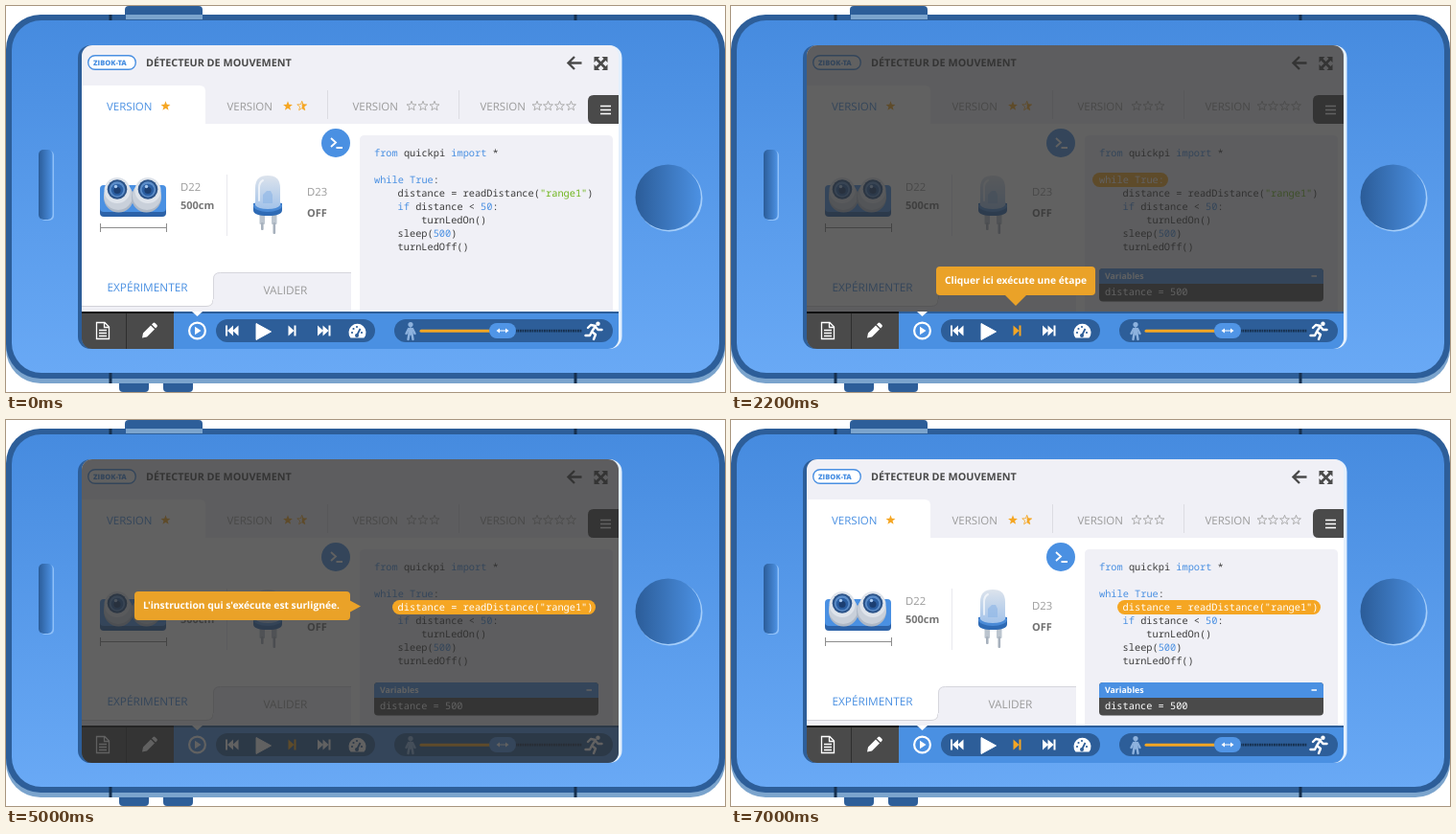
Animation, 750 px wide and 403 px high, one loop 8 s. Source, as an HTML page:

```html
<!DOCTYPE html>
<html lang="fr">
<head>
<meta charset="utf-8">
<title>Détecteur de mouvement</title>
<style>
html, body { margin: 0; width: 100%; height: 100%; overflow: hidden; background: #fff; }
svg { display: block; width: 750px; height: 403px; }
text { font-family: "Open Sans", "Noto Sans", sans-serif; white-space: pre; text-rendering: geometricPrecision; }
.code { font: 500 10.3px "Noto Sans Mono", "DejaVu Sans Mono", monospace; }
</style>
</head>
<body>
<svg id="stage" viewBox="0 0 750 403"></svg>
<script>
const BLUE = '#4a90e2', NAVY = '#2d5e99', DARK = '#4a4a4a', ORANGE = '#f5a623',
      PALE = '#f0f0f6', GREY = '#9b9b9b', INK = '#16304f', TIP = '#eaa228';

const rect = (x, y, w, h, fill, rx = 0, extra = '') =>
  `<rect x="${x}" y="${y}" width="${w}" height="${h}" rx="${rx}" fill="${fill}" ${extra}/>`;
const circle = (x, y, r, fill, extra = '') =>
  `<circle cx="${x}" cy="${y}" r="${r}" fill="${fill}" ${extra}/>`;
const shape = (d, fill, extra = '') => `<path d="${d}" fill="${fill}" ${extra}/>`;
const line = (d, color, width = 1, extra = '') =>
  `<path d="${d}" fill="none" stroke="${color}" stroke-width="${width}" ${extra}/>`;
const text = (x, y, s, size, fill, weight = 400) =>
  `<text x="${x}" y="${y}" font-size="${size}" fill="${fill}" font-weight="${weight}">${s}</text>`;
const code = (x, y, s, fill = '#3c3c3c') => `<text class="code" x="${x}" y="${y}" fill="${fill}">${s}</text>`;
const tint = (s, fill = BLUE) => `<tspan fill="${fill}">${s}</tspan>`;
const gradient = (id, from, to, across) =>
  `<linearGradient id="${id}" x2="${across ? 1 : 0}" y2="${across ? 0 : 1}">
   <stop stop-color="${from}"/><stop offset="1" stop-color="${to}"/></linearGradient>`;
const ROUND = 'stroke-linecap="round" stroke-linejoin="round"';

function starPath(cx, cy, count = 10) {
  const points = [];
  for (let i = 0; i <= count; i++) {
    const r = i % 2 ? 2.2 : 5.2, a = i * Math.PI / 5 - Math.PI / 2;
    points.push((cx + r * Math.cos(a)).toFixed(2) + ' ' + (cy + r * Math.sin(a)).toFixed(2));
  }
  return 'M' + points.join('L') + 'Z';
}
const fullStar = x => shape(starPath(x, 104.5), ORANGE);
const emptyStar = x => line(starPath(x, 104.5), '#a6a6a6', 0.9);

function phone() {
  const ticks = [107.5, 592.5].map(x => rect(x, 9, 3, 6, INK) + rect(x, 383, 3, 11, INK)).join('');
  return rect(118, 386, 31, 17, NAVY, 4) + rect(164, 386, 31, 17, NAVY, 4) +
    rect(0, 22, 750, 372, '#7ba4cd', 36) +
    rect(0, 9, 750, 380, NAVY, 36) +
    rect(6, 15, 738, 368, 'url(#body)', 31) + ticks +
    shape('M124 10V4q0-4 4-4h73q4 0 4 4v6z', NAVY) + rect(125, 9, 80, 5, '#7ba4cd') +
    rect(35.5, 151, 14.5, 73, '#8fc0f8', 5) + rect(34, 150, 14.5, 73, 'url(#slot)', 5) +
    circle(692, 201, 34.5, '#a5cefa') + circle(690.7, 199.7, 34.2, 'url(#slot)') +
    rect(75, 41, 100, 317, NAVY, 13) + rect(540, 41, 102.5, 317, '#e4f0fd', 13);
}

function header() {
  const corners = [[-1, -1], [1, -1], [-1, 1], [1, 1]].map(([a, b]) => {
    const x = 620.5 + 7 * a, y = 60 + 7 * b;
    return shape(`M${x} ${y}h${-6 * a}L${x} ${y - -6 * -b}z`, DARK);
  }).join('');
  return rect(79, 41, 560, 82, PALE) +
    rect(85.7, 51.7, 49.6, 14.6, '#fff', 7.3, `stroke="${BLUE}" stroke-width="1.4"`) +
    text(91, 61.7, 'ZIBOK-TA', 7.5, BLUE, 800) +
    text(146, 63, 'DÉTECTEUR DE MOUVEMENT', 10.8, DARK, 700) +
    line('M600.5 59.5H587M593 53l-6.5 6.5L593 66', DARK, 2.4) +
    corners + line('M616 55.5l9 9M625 55.5l-9 9', DARK, 2.6);
}

function tabs() {
  const labels = [105, 230.5, 361.5, 494.5].map((x, i) => text(x, 109, 'VERSION', 11.5, i ? GREY : BLUE)).join('');
  return shape('M79 83h123q6 0 6 6v34H79z', '#fff') + labels +
    line('M335.5 88v30M472.5 88v30', '#dcdce2') +
    fullStar(166.5) + fullStar(294) + line(starPath(308.7, 104.5), ORANGE, 0.8) +
    shape(starPath(308.7, 104.5, 10), ORANGE, 'clip-path="url(#half)"') +
    [423, 435, 447, 554, 565.5, 577.5, 589.5].map(emptyStar).join('') +
    shape('M639 93h-26q-6 0-6 6v18q0 6 6 6h26z', DARK) +
    line('M620 104.5h11M620 108.5h11M620 112.5h11', '#fff', 1.7);
}

function sensor() {
  const eye = (x, lean) => circle(x + lean, 200, 15.5, '#aeb8c6') + circle(x + lean * 0.7, 198, 15, '#c9d0da') +
    circle(x, 192.5, 13.5, '#dfe4eb') + circle(x, 191.5, 10.3, '#2c5388') +
    circle(x, 191.5, 8.2, '#5c8dc9') + circle(x, 192, 6.3, '#2b5fa3') + circle(x, 192.5, 3.6, '#1c3f72') +
    circle(x - 1.5, 188.5, 1.7, '#a9c9ef');
  return rect(98, 190, 69, 30, '#2c62a8', 4) + rect(98, 187, 69, 28, BLUE, 4) + eye(116, 1.5) + eye(148, -1.5) +
    line('M98.5 231.5h69M98.5 227v9M167.5 227v9', '#8d8d8d') +
    text(182, 193, 'D22', 11.3, GREY) + text(182, 212, '500cm', 11, '#777', 700);
}

function led() {
  const leg = (x, h) => rect(x, 217, 5.5, 11, '#bcc5cf', 1) + rect(x + 1.5, 226, 2.6, h, '#a7b1bd', 1);
  return line('M230.5 176v64', '#e9e9ee') + leg(264.5, 8) + leg(277, 12) +
    shape('M258 206h30v7q0 6-15 6t-15-6z', '#2f6bb5') +
    '<ellipse cx="273" cy="208.5" rx="15" ry="6.5" fill="#4a8ad6"/>' +
    shape('M260 208v-18q0-13 13-13t13 13v18q-3 4-13 4t-13-4z', 'url(#dome)') +
    shape('M268 206v-9l4-4h4l2 4v9z', '#8fb7e6', 'opacity=".65"') +
    line('M264 203v-13q0-6 4-8', '#fff', 2, 'stroke-linecap="round" opacity=".65"') +
    text(314, 198, 'D23', 11.3, GREY) + text(314, 220, 'OFF', 11, '#707070', 700);
}

function workspace() {
  return rect(79, 123, 560, 196, '#fff') + sensor() + led() +
    rect(79, 300, 281, 19, PALE) + shape('M79 278h137v29q0 7-7 7H79z', '#fff') +
    line('M79 313.5h130q7 0 7-7', '#d2d2d8') +
    shape('M216 319v-34q0-7 7-7h137v41z', PALE) + line('M216.5 306v-21q0-6.5 7-6.5H360', '#d6d6dc') +
    text(105.5, 298, 'EXPÉRIMENTER', 11.8, BLUE) + text(268.5, 301, 'VALIDER', 11.8, GREY) +
    shape('M369 319V140q0-5 5-5h254q5 0 5 5v179z', PALE) +
    circle(344, 143, 15, BLUE) + line('M339 138l5 4.5-5 4.5M344.5 148h6.5', '#fff', 1.8);
}

function program() {
  return code(384, 157, `${tint('from')} quickpi ${tint('import')} *`) +
    code(384, 185, `${tint('while True')}:`) +
    code(408.6, 199, `distance = readDistance(${tint('"range1"', '#6fb51c')})`) +
    code(408.6, 213, `${tint('if')} distance &lt; ${tint('50')}:`) +
    code(433.3, 227, 'turnLedOn()') +
    code(408.6, 241, `sleep(${tint('500')})`) +
    code(408.6, 255, 'turnLedOff()');
}

function variables() {
  return rect(384, 274, 234, 34.5, DARK, 4) + shape('M384 290v-12q0-4 4-4h226q4 0 4 4v12z', BLUE) +
    text(390, 285, 'Variables', 8.8, '#fff', 700) + line('M605.5 282h5.5', '#fff', 1.5) +
    code(390, 302, 'distance = 500', '#fff');
}

function toolbar() {
  const icon = (d, extra) => shape(d, '#fff', extra);
  const run = 'M615 334l-4 6 4 3-2 5M611 340l-2 4h-4.500M615 334l-5-1-3 3M615 335l2.500 3h4';
  const walker = circle(422, 332.5, 2.6, '#8db2de') +
    line('M422 336.500v6M420.500 342l-1 6M423.500 342l1 6M420 337l-2.500 5M424 337l2.500 5', '#8db2de', 2.4, ROUND) +
    rect(419.5, 336, 5, 7, '#8db2de', 2);
  const gauge = icon('M359.500 346.500a9 9 0 1 1 14 0z') +
    line('M366 344l3.500-7', NAVY, 1.8) + circle(366, 344, 2, NAVY) +
    [[361, 341], [362.5, 337], [366, 335], [371, 341]].map(([x, y]) => circle(x, y, 1.1, NAVY)).join('');
  return rect(79, 319, 560, 39, BLUE) + rect(79, 319, 560, 2, NAVY) +
    rect(79, 319, 96, 39, DARK) + rect(79, 319, 96, 2, '#111') + line('M125.500 321v37', '#2e2e2e') +
    line('M94.500 330.500h8.500l4.500 4.500v12.500h-13zM102.500 330.500v5h5M97 338.500h8M97 341.500h8M97 344.500h8', '#fff', 1.3) +
    icon('M142 346.500l1-5 8-8 4 4-8 8zM152 332.500l1.500-1.500q1-.8 2 0l2 2q.8 1 0 2l-1.500 1.500z') +
    icon('M194 319h11l-5.500 5z') + circle(199.5, 339, 8.4, 'none', 'stroke="#fff" stroke-width="2.2"') +
    icon('M197 334.800v8.400l6.500-4.200z') +
    rect(219, 327, 166, 24, NAVY, 12) +
    icon('M229 333.500h2v11h-2zM237 333.500v11l-6-5.500zM242.500 333.500v11l-6-5.500z') +
    icon('M261 331.500v17l15.500-8.500z', 'stroke="#fff" stroke-linejoin="round"') +
    '<path id="step" d="M294.500 333.500v11l6-5.500zM300.500 333.500h2v11h-2z"/>' +
    icon('M325 333.500v11l6-5.500zM330.500 333.500v11l6-5.500zM336.500 333.500h2v11h-2z') + gauge +
    rect(405, 327, 228, 24, NAVY, 12) + walker +
    line('M433 339.200h75', ORANGE, 3, 'stroke-linecap="round"') +
    line('M531 339.200h70', INK, 2.8, 'stroke-dasharray="1.800 .7"') +
    rect(504, 331, 28, 16, '#5095e6', 8) +
    icon('M511.500 339l3.500-2.500v2h6v-2l3.500 2.500-3.500 2.500v-2h-6v2z') +
    circle(617.5, 331.8, 2.2, '#fff') + line(run, '#fff', 2.4, ROUND);
}

const highlight = (x, y, w, base, s) => rect(x, y, w, 15, ORANGE, 7.5) + code(base, y + 11, s, '#fff');
const tooltip = (x, y, w, arrow, s) =>
  rect(x, y, w, 30, TIP, 4) + shape(arrow, TIP) + text(x + 9, y + 18, s, 10.28, '#fff', 700);
const layer = (id, content) => `<g id="${id}">${content}</g>`;

const stage = document.getElementById('stage');
stage.innerHTML = `<defs>
  ${gradient('body', '#468bdf', '#69a9f5')}
  ${gradient('slot', '#2b5c98', '#4c91e3', true)}
  ${gradient('dome', '#dce3ec', '#a3c3ea')}
  <clipPath id="screen">${rect(79, 41, 560, 317, '#fff', 11)}</clipPath>
  <clipPath id="half">${rect(308.7, 98, 7, 13, '#fff')}</clipPath></defs>
  ${phone()}
  <g clip-path="url(#screen)">
    ${header()}${tabs()}${workspace()}${program()}
    ${layer('variables', variables())}
    ${layer('loopMark', highlight(377, 174, 79, 384, 'while True:'))}
    ${toolbar()}
    <rect id="dim" x="79" y="41" width="560" fill="#2d2d2d" opacity=".75"/>
  </g>
  ${layer('readMark', highlight(403, 188, 212, 408.6, 'distance = readDistance("range1")'))}
  ${layer('stepTip', tooltip(214, 272, 166, 'M285 301h24l-12 12z', 'Cliquer ici exécute une étape'))}
  ${layer('lineTip', tooltip(134, 179, 225, 'M358 188l12 6.500-12 6.500z', "L'instruction qui s'exécute est surlignée."))}`;

const $ = id => document.getElementById(id);
const show = (id, on) => $(id).setAttribute('visibility', on ? 'visible' : 'hidden');

function draw(t) {
  const stepping = t >= 1000, reading = t >= 5000;
  const stepTip = stepping && t < 3000, lineTip = reading && t < 7000;
  show('variables', stepping);
  show('loopMark', stepping && !reading);
  show('readMark', reading);
  show('stepTip', stepTip);
  show('lineTip', lineTip);
  $('dim').setAttribute('height', stepTip ? 278 : lineTip ? 317 : 0);
  $('step').setAttribute('fill', stepping ? ORANGE : '#fff');
}

const start = performance.now();
function tick() {
  draw((performance.now() - start) % 8000);
  requestAnimationFrame(tick);
}
tick();
</script>
</body>
</html>
```
